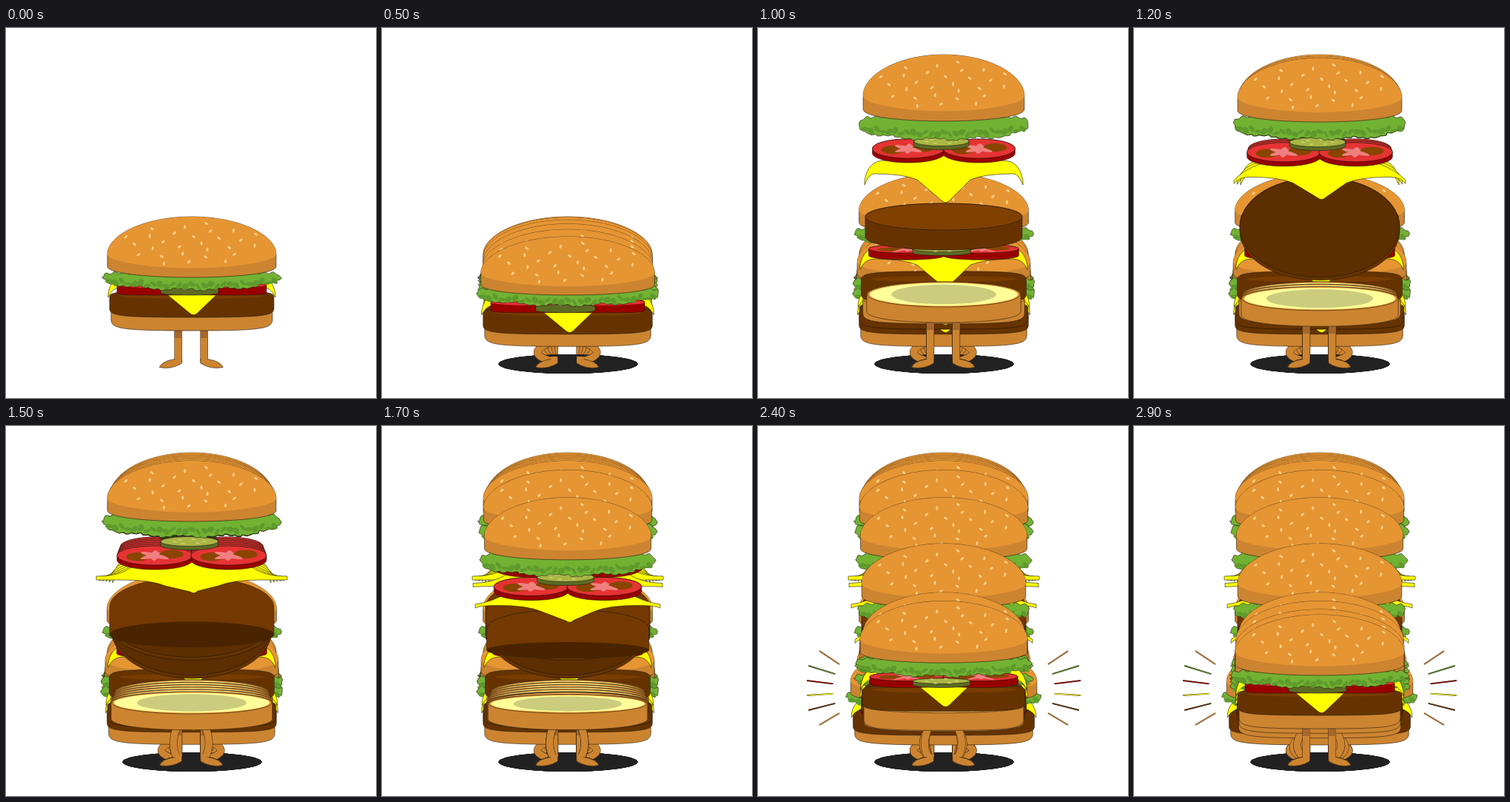
Write an HTML page with a canvas that moves like this. It is 500 by 500 pixels and loops after 3000 ms.

```html
<!DOCTYPE html>
<html>
<head>
<meta charset="utf-8">
<title>Jumping burger</title>
<style>
html, body { margin: 0; width: 100%; height: 100%; overflow: hidden; background: #fff; }
canvas { display: block; width: 500px; height: 500px; }
</style>
</head>
<body>
<canvas id="stage" width="500" height="500"></canvas>
<script>
const g = document.getElementById('stage').getContext('2d');
const LOOP = 3000, CX = 251, GOLDEN = 2.39996;

// Steps of the movement at which a phase ends.
const CROUCH = 5, TOP = 8, DROP = 13, LAND = 18, STRETCH = 21, DIP = 25, REST = 27;

const clamp = v => Math.max(0, Math.min(1, v));
const lerp = (a, b, u) => a + (b - a) * u;
const mix = (a, b, u) => Object.fromEntries(Object.keys(a).map(k => [k, lerp(a[k], b[k], u)]));

// Steps are 100 ms apart, with a pause while crouching.
const stepAt = t => {
  const n = Math.floor(t / 100);
  return n < 6 ? n : n < 8 ? CROUCH : n - 2;
};

// The stack pulled apart in the air, on the way up and on the way down.
const RISE = {
  bun: 36, w: .955, tomato: 163, pickle: 153, cheese: 197, droop: 15, drip: 39, span: 107,
  patty: 255, tilt: 18, base: 360, baseTilt: 17
};
const FALL = {
  bun: 47, w: 1, tomato: 175, pickle: 156, cheese: 208, droop: 0, drip: 18, span: 129,
  patty: 245, tilt: -17, base: 374, baseTilt: 15
};

// The stack on its feet, its top lowered by d: first the knees give, then the layers.
function closed(d) {
  const knees = d > 0 ? Math.min(.78 * d, 21) : 0;
  const y = (rest, height) => rest + knees + (d - knees) * height;
  const w = 1 + 1.5e-6 * d ** 3;
  return {
    bun: y(255, 1), w, tomato: y(347, .45), pickle: y(353, .45),
    cheese: y(350, .45), droop: 14, drip: 38 - 2 * Math.max(0, d - 27), span: 113 * w,
    patty: y(363, .3), tilt: 8, base: y(380, .05), baseTilt: 4 + Math.max(0, -d / 4)
  };
}

function depth(i) {
  if (i <= CROUCH) return 27 * (i / CROUCH) ** 2;
  if (i <= STRETCH) return lerp(41, -30, ((i - LAND) / (STRETCH - LAND)) ** .6);
  if (i <= DIP) return lerp(-30, 16, (i - STRETCH) / (DIP - STRETCH));
  return lerp(16, 0, (i - DIP) / (REST - DIP));
}

function pose(i) {
  if (i <= CROUCH || i >= LAND) return closed(depth(i));
  if (i <= TOP) {
    const from = closed(27), u = (i - CROUCH) / (TOP - CROUCH);
    return { ...mix(from, RISE, u ** 2.6), base: lerp(from.base, RISE.base, Math.sqrt(u)) };
  }
  if (i <= DROP) {
    const u = (i - TOP) / (DROP - TOP), turn = Math.sin(Math.PI * u);
    const p = mix(RISE, FALL, u);
    return u < 1 ? { ...p, flip: 1, tilt: 18 + 52 * turn, patty: 255 + 15 * turn } : p;
  }
  return mix(FALL, { ...closed(-9), w: .95 }, ((i - DROP) / 4) ** 2);
}

function paint(fill, outline = true) {
  g.fillStyle = fill;
  g.fill();
  if (!outline) return;
  g.strokeStyle = '#221a10';
  g.lineWidth = .6;
  g.stroke();
}

function oval(x, y, rx, ry, fill, outline = false, turn = 0) {
  g.beginPath();
  g.ellipse(x, y, rx, ry, turn, 0, 7);
  paint(fill, outline);
}

function line(x1, y1, x2, y2, width, color) {
  g.beginPath();
  g.moveTo(x1, y1);
  g.lineTo(x2, y2);
  g.lineWidth = width;
  g.strokeStyle = color;
  g.stroke();
}

// Disc seen from the side; roundness k: .55 is an ellipse, larger is flatter.
function slab(x, hw, top, bottom, rt, rb, k, fill) {
  g.beginPath();
  g.moveTo(x - hw, top);
  g.bezierCurveTo(x - hw, top - rt * k, x - hw * k, top - rt, x, top - rt);
  g.bezierCurveTo(x + hw * k, top - rt, x + hw, top - rt * k, x + hw, top);
  g.lineTo(x + hw, bottom);
  g.bezierCurveTo(x + hw, bottom + rb * k, x + hw * k, bottom + rb, x, bottom + rb);
  g.bezierCurveTo(x - hw * k, bottom + rb, x - hw, bottom + rb * k, x - hw, bottom);
  g.closePath();
  paint(fill);
}

function legs(p) {
  const bend = 45 * Math.sqrt(clamp((p.hip - 409) / 21));
  for (const side of [1, -1]) {
    g.save();
    g.translate(-.75, 0);
    g.scale(side, 1);
    for (const [width, color] of [[10.6, '#3a2713'], [9.6, '#cc8430']]) {
      g.beginPath();
      g.moveTo(-17.5, p.hip - 8);
      g.quadraticCurveTo(-17.5 - bend, (p.hip + 450) / 2, -17.5, 451);
      g.lineWidth = width;
      g.strokeStyle = color;
      g.stroke();
    }
    if (bend < 10) line(-17.5, p.hip - 6, -17.5, p.hip + 10, 9.6, '#a5672a');
    g.beginPath();
    g.moveTo(-12.6, 447);
    g.lineTo(-12.6, 453);
    g.quadraticCurveTo(-27, 462, -43, 458.5);
    g.quadraticCurveTo(-39, 450, -22.5, 447.5);
    g.closePath();
    paint('#cc8430');
    line(-17.5, 444, -17.5, 450, 9, '#cc8430');
    g.restore();
  }
}

function lowerBun(p) {
  const hw = 109 * p.w, { base, baseTilt: r } = p;
  slab(0, hw, base, p.hip - 15, r, 15, r > 12 ? .6 : .85, '#cc8430');
  if (r < 5) return;
  oval(0, base, hw - 1, r, '#e69533', true);
  oval(0, base, hw - 4, r - 1.5, '#ffff99');
  oval(0, base, hw * .68, r * .78, '#cccc7f');
}

function patty(p) {
  const { patty: y, tilt, flip } = p, r = Math.abs(tilt), hw = 111 * p.w;
  if (tilt < 0) {
    const thick = 16 + 1.2 * r;
    slab(0, hw, y, y + thick, 2.4 * r, r, .57, '#733900');
    oval(0, y + thick, hw, r, '#4a2400');
    return;
  }
  const thick = flip ? 4 : 16 + 11 * clamp((r - 8) / 10), open = r > 12;
  slab(0, hw, y, y + thick, r, Math.max(12, r), open ? .57 : .85, '#663300');
  if (open) oval(0, y, hw, r, flip ? '#5c2e00' : '#804000', true);
  else oval(0, y - 1, hw * .88, 4, '#7a3d00');
}

function cheese(p) {
  const { span, cheese: y, droop, drip } = p;
  const tip = y + drip, wing = y + droop, top = y - 18;
  const hang = clamp(droop / 14);
  const hornX = span - 30 + 26 * hang, hornY = lerp(wing - 4, top, hang);
  g.beginPath();
  g.moveTo(-span, wing);
  g.quadraticCurveTo(-span + 6, y, -94, y);
  g.quadraticCurveTo(-55, y, -36, y + 8);
  g.lineTo(-2, tip - 2);
  g.quadraticCurveTo(3, tip + 2, 8, tip - 3);
  g.lineTo(36, y + 8);
  g.quadraticCurveTo(55, y, 94, y);
  g.quadraticCurveTo(span - 6, y, span, wing);
  g.lineTo(span, wing - 5);
  g.quadraticCurveTo(hornX, hornY, 80, top);
  g.quadraticCurveTo(0, top - 12, -80, top);
  g.quadraticCurveTo(-hornX, hornY, -span, wing - 5);
  g.closePath();
  paint('#ffff00');
}

function tomatoes(p) {
  const rx = 51 * p.w, ry = 4 + 9 * p.open, y = p.tomato, wide = p.open > .2;
  for (const side of [-1, 1]) {
    const x = side * 50 * p.w;
    slab(x, rx, y, y + 10 - 4 * p.open, ry, ry, wide ? .56 : .85, '#990000');
    oval(x, y, rx, ry, '#e63333', wide);
    if (!wide) continue;
    for (const s of [-1, 1]) {
      oval(x + s * rx * .44, y - s * ry * .12, rx * .32, ry * .45, '#8a4500');
      oval(x, y, rx * .38, ry * .22, '#f08080', false, s * .22);
    }
    oval(x, y, rx * .1, ry * .55, '#f08080', false, .4);
  }
}

function pickle(p) {
  const ry = 3 + 3.5 * p.open, rx = 39 * p.w;
  slab(-3, rx, p.pickle, p.pickle + 5, ry, ry, .57, '#5e6b24');
  if (p.open < .2) return;
  oval(-3, p.pickle, rx, ry, '#a9b544', true);
  for (let a = 0; a < 6; a++)
    oval(-3 + 20 * Math.cos(a), p.pickle + 3 * Math.sin(a), 3, 1, '#c8cf6a');
}

function lettuce(p) {
  const hw = 120 * p.w, h = 10 + 4 * p.open;
  const mid = x => p.bun + p.h + (1 - p.w) * 90 + 7 * (1 - (x / hw) ** 2);
  const tall = x => h * Math.max(0, 1 - (Math.abs(x) / hw) ** 6) ** .4;
  g.beginPath();
  for (let x = -hw; x <= hw; x += 2)
    g.lineTo(x, mid(x) - tall(x) + 1.5 * Math.sin(x * .5));
  for (let x = hw; x >= -hw; x -= 1.5)
    g.lineTo(x + 1.5 * Math.sin(x * .8),
      mid(x) + tall(x) - 2 + 2 * Math.abs(Math.sin(x * .27)) + 1.5 * Math.sin(x * .11));
  g.closePath();
  paint('#72b233');
  for (let n = 0; n < 27; n++) {
    const x = (n / 13 - 1) * (hw - 8);
    oval(x, mid(x) + h * .4 + 2 * Math.sin(n * 2.3), 5, 3 + Math.sin(n * 1.7), '#5f9a2c', false, Math.sin(n));
  }
}

function topBun(p) {
  const hw = 114 * p.w, { h, bun: y } = p;
  const dome = () => {
    g.beginPath();
    g.moveTo(-hw, y + .62 * h);
    g.bezierCurveTo(-hw, y + .3 * h, -.56 * hw, y, 0, y);
    g.bezierCurveTo(.56 * hw, y, hw, y + .3 * h, hw, y + .62 * h);
  };
  const close = (side, bottom, fill, outline) => {
    g.lineTo(hw, y + side * h);
    g.bezierCurveTo(hw, y + (side + .12) * h, .5 * hw, y + bottom * h, 0, y + bottom * h);
    g.bezierCurveTo(-.5 * hw, y + bottom * h, -hw, y + (side + .12) * h, -hw, y + side * h);
    g.closePath();
    paint(fill, outline);
  };
  dome();
  close(.82, 1, '#cc8430', true);
  dome();
  close(.62, .85, '#e69533', false);
  // Sesame in a sunflower spiral
  for (let n = 0; n < 28; n++) {
    const r = Math.sqrt((n + .5) / 28), a = n * GOLDEN;
    const x = 98 * r * Math.cos(a), sy = 36 + 30 * r * Math.sin(a);
    oval(x * p.w, y + sy * h / 82, 1.5, 2.7, '#f7cf80', false, Math.sin(n * 2.1) * 1.1);
  }
}

function burst() {
  const colors = ['#cc8430', '#5f9a2c', '#990000', '#ffff00', '#663300', '#cc8430'];
  colors.forEach((color, n) => {
    const s = (n - 2.5) / 2.5;
    for (const side of [-1, 1])
      for (const [width, c] of [[1.9, '#2b2115'], [1.1, color]])
        line(side * (185 - 17 * s ** 4), 354 + 50 * s, side * (150 - 9 * s * s), 355 + 33 * s, width, c);
  });
}

function splash() {
  g.beginPath();
  g.moveTo(-22, 382);
  g.quadraticCurveTo(-8, 379, -5, 373);
  g.quadraticCurveTo(0, 368, 5, 373);
  g.quadraticCurveTo(12, 377, 27, 382);
  g.quadraticCurveTo(28, 386, 20, 386);
  g.quadraticCurveTo(0, 389, -18, 386);
  g.closePath();
  paint('#ffff00');
}

function burger(i) {
  const p = pose(i);
  p.h = Math.max(79, 82 / p.w ** 2);
  p.open = clamp((p.tomato - p.bun - 97) / 25);
  p.hip = p.base + 29 + Math.max(0, p.baseTilt - 4) * .7;
  if (i > 0 && i <= CROUCH) oval(.5, 454, 94, 13, '#222222');
  if (i === LAND) burst();
  for (const part of [legs, lowerBun, patty, cheese, tomatoes, pickle, lettuce, topBun]) part(p);
  if (i === LAND) splash();
}

// Every pose stays on the stage until the loop restarts.
let shown = -1;
function tick() {
  const step = stepAt(performance.now() % LOOP);
  if (step !== shown) {
    shown = step;
    g.setTransform(1, 0, 0, 1, 0, 0);
    g.fillStyle = '#fff';
    g.fillRect(0, 0, 500, 500);
    g.translate(CX, 0);
    for (let i = 0; i <= step; i++) burger(i);
  }
  requestAnimationFrame(tick);
}
tick();
</script>
</body>
</html>
```
